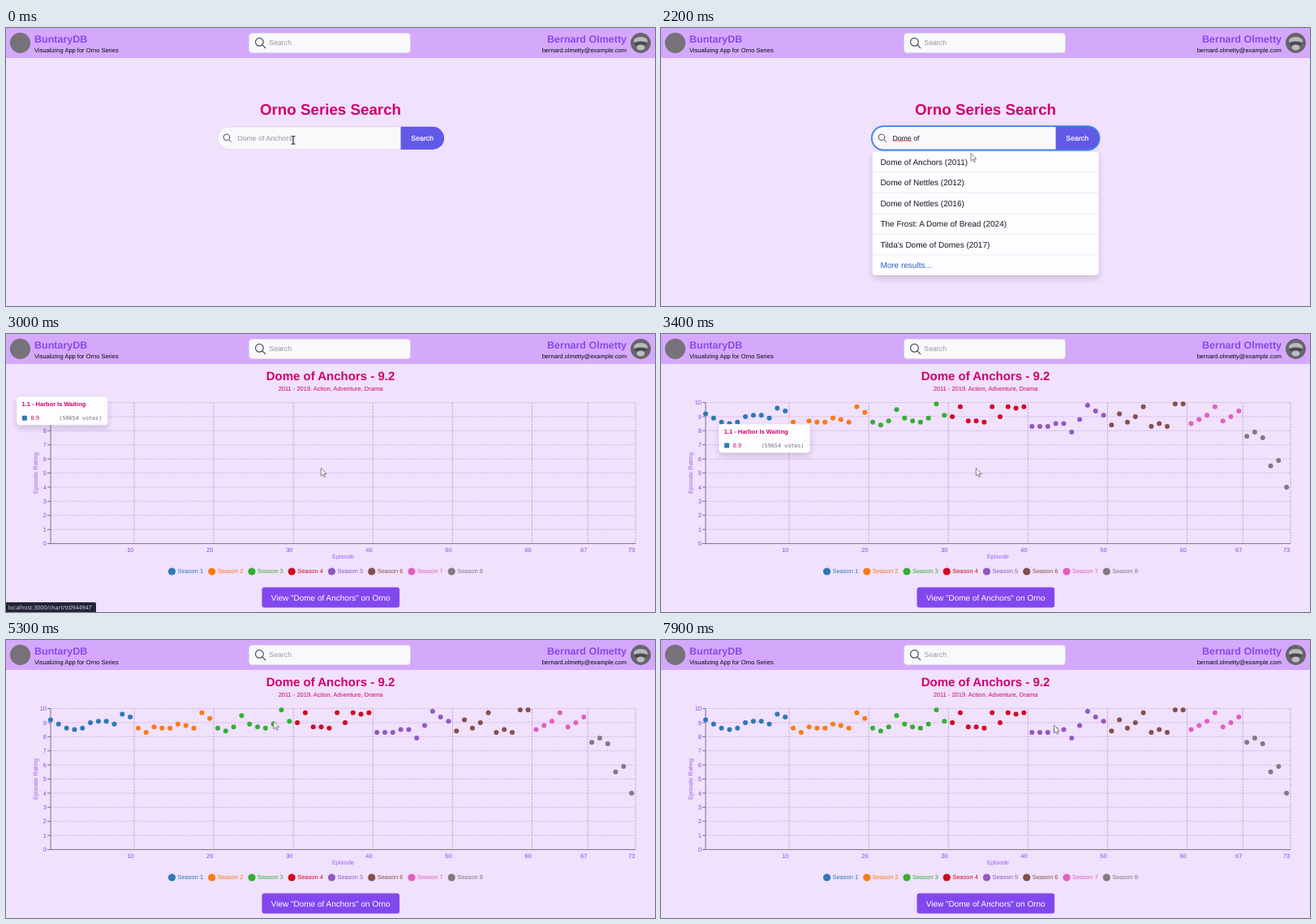
These frames come from a looping animation (800x343 px, 8000 ms). An HTML page:

```html
<!DOCTYPE html>
<html lang="en">
<head>
<meta charset="utf-8">
<title>Series search</title>
<style>
  html, body { margin: 0; width: 100%; height: 100%; overflow: hidden; background: #f0e1fc; }
  svg { display: block; width: 100%; height: 100%; }
  text {
    font-family: "Liberation Sans", Arial, sans-serif;
    white-space: pre;
    text-rendering: geometricPrecision;
  }
  .b { font-weight: 700; }
  .mono { font-family: "DejaVu Sans Mono", monospace; }
  .status { font-family: "Open Sans", sans-serif; }
</style>
</head>
<body>
<svg id="stage" viewBox="0 0 800 343">
  <defs>
    <clipPath id="round"><circle cx="782.4" cy="18.3" r="12.6"/></clipPath>
    <filter id="soft"><feGaussianBlur stdDeviation=".7"/></filter>
    <filter id="shadow" x="-20%" y="-20%" width="140%" height="150%">
      <feDropShadow dx="0" dy="4" stdDeviation="3.5" flood-color="#402060" flood-opacity=".2"/>
    </filter>
  </defs>
</svg>
<script>
const LOOP = 8000, STEP = 100;
const PINK = '#d0006f', VIOLET = '#8a48ee', INK = '#16161f', GREY = '#9395a2';
const SMALL = 7.5, INPUT = 8.75, BODY = 10, NAME = 12.5;
const SHOW = 'Dome of Anchors';
const stage = document.getElementById('stage');

function add(parent, tag, attrs = {}, content) {
  const el = document.createElementNS('http://www.w3.org/2000/svg', tag);
  for (const k in attrs) el.setAttribute(k, attrs[k]);
  if (content !== undefined) el.textContent = content;
  parent.append(el);
  return el;
}
const group = (parent, attrs) => add(parent, 'g', attrs);
const rect = (p, x, y, width, height, fill, more) =>
  add(p, 'rect', { x, y, width, height, fill, ...more });
const circle = (p, cx, cy, r, fill, more) => add(p, 'circle', { cx, cy, r, fill, ...more });
const ellipse = (p, cx, cy, rx, ry, fill) => add(p, 'ellipse', { cx, cy, rx, ry, fill });
const line = (p, x1, y1, x2, y2, stroke, more) =>
  add(p, 'line', { x1, y1, x2, y2, stroke, ...more });
const path = (p, d, more) => add(p, 'path', { d, fill: 'none', ...more });
const label = (p, x, y, size, fill, str, more) =>
  add(p, 'text', { x, y, 'font-size': size, fill, ...more }, str);
const show = (el, on) => el.setAttribute('visibility', on ? 'visible' : 'hidden');
const MID = { 'text-anchor': 'middle' }, END = { 'text-anchor': 'end' };
const BOLD = { class: 'b' };

function lens(p, x, y, r, tail, width) {
  const g = group(p, { stroke: '#4b4d5c', 'stroke-width': width, 'stroke-linecap': 'round' });
  circle(g, x, y, r, 'none');
  line(g, x + r * .72, y + r * .72, x + tail, y + tail);
}

// Soft grey shapes in the tones of a furry portrait
function portrait() {
  const g = group(group(stage, { 'clip-path': 'url(#round)' }), { filter: 'url(#soft)' });
  circle(g, 782.4, 18.3, 12.6, '#66656c');
  ellipse(g, 782.4, 16, 8.5, 5, '#b9b8bc');
  ellipse(g, 782.4, 19.3, 8, 2.8, '#4a4950');
  ellipse(g, 782.4, 24, 5, 3.4, '#bdbcc0');
}

// Header
function buildHeader() {
  rect(stage, 0, 0, 800, 37, '#d4a9fb');
  circle(stage, 17.5, 18.3, 12.6, '#77727a');
  label(stage, 35, 17.5, NAME, VIOLET, 'BuntaryDB', BOLD);
  label(stage, 35, 30, SMALL, '#0c0812', 'Visualizing App for Orno Series');
  rect(stage, 299.5, 6.3, 199, 24.4, '#f9f9fc', { rx: 4, stroke: '#d3cfe2', 'stroke-width': .7 });
  lens(stage, 312.4, 17.3, 4.9, 7.2, 1.2);
  label(stage, 324.3, 21.4, INPUT, GREY, 'Search');
  label(stage, 765, 17.5, NAME, VIOLET, 'Bernard Olmetty', { ...BOLD, ...END });
  label(stage, 765, 30, SMALL, '#0c0812', 'bernard.olmetty@example.com', END);
  portrait();
}

// Search page
const RESULTS = [
  [SHOW + ' (2011)', 'Quail Dome (2021)', "The Potter's Domino (2020)",
   'Hollow Domes (2018)', 'The Foam Dome (2022)'],
  [SHOW + ' (2011)', 'Dome of Nettles (2012)', 'Dome of Nettles (2016)',
   'The Frost: A Dome of Bread (2024)', "Tilda's Dome of Domes (2017)"],
];
const KEYS = [[500, 'D'], [600, 'Do'], [800, 'Dom'], [1200, 'Dome'],
  [1400, 'Dome '], [1500, 'Dome o'], [1600, 'Dome of']];

function buildSearch() {
  const page = group(stage);
  label(page, 400, 106.5, 18.75, PINK, 'Orno Series Search', { ...BOLD, ...MID });
  path(page, 'M487 122H275a13.9 13.9 0 0 0 0 27.8H487Z',
    { style: 'fill:#f9f9fc', stroke: '#d9d3e6', 'stroke-width': .7 });
  path(page, 'M486.6 121.8H526a14.1 14.1 0 0 1 0 28.2H486.6Z', { style: 'fill:#6159e8' });
  label(page, 513.2, 138.8, INPUT, '#fff', 'Search', { ...MID, stroke: '#fff', 'stroke-width': .2 });
  lens(page, 271.9, 134.8, 3.8, 5.7, 1);
  const ring = rect(page, 259.7, 121.1, 280.8, 29.6, 'none',
    { rx: 14.8, stroke: '#3d7fe8', 'stroke-width': 1.7 });
  const input = label(page, 285.4, 138.8, INPUT, GREY, SHOW);
  const caret = line(page, 0, 130.7, 0, 140.5, INK, { 'stroke-width': .8 });
  const wave = 'M285.5 140' + 'l1.5 -1.4l1.5 1.4'.repeat(8);
  const squiggle = path(page, wave, { stroke: '#e0303c', 'stroke-width': .8 });

  const list = group(page);
  rect(list, 260.8, 152.7, 278.6, 152.4, '#fdfcfe', { rx: 4, filter: 'url(#shadow)' });
  const hover = rect(list, 260.8, 153, 278.6, 25, '#efeef4', { rx: 3 });
  const rows = RESULTS[0].map((_, i) => {
    line(list, 261, 178.1 + i * 25.45, 539.4, 178.1 + i * 25.45, '#e5e3ec', { 'stroke-width': .7 });
    return label(list, 270.4, 168.8 + i * 25.45, BODY, INK, '');
  });
  label(list, 270.4, 296, BODY, '#2c5cc5', 'More results...');

  return t => {
    page.setAttribute('display', t < 2800 ? 'inline' : 'none');
    if (t >= 2800) return;
    const typed = KEYS.reduce((s, [at, str]) => t >= at ? str : s, '');
    input.textContent = typed || SHOW;
    input.setAttribute('fill', typed ? INK : GREY);
    const focused = t >= 300;
    show(ring, focused);
    const x = 285.8 + (typed ? input.getComputedTextLength() : 0);
    caret.setAttribute('x1', x);
    caret.setAttribute('x2', x);
    show(caret, focused && (t < 2100 || t >= 2600));
    show(squiggle, t >= 1800);
    list.setAttribute('display', t >= 1000 ? 'inline' : 'none');
    show(hover, t >= 2400);
    RESULTS[t < 1800 ? 0 : 1].forEach((str, i) => rows[i].textContent = str);
  };
}

// Chart page
const SEASONS = [
  ['#2f79b5', [9.2, 8.9, 8.6, 8.5, 8.6, 9, 9.1, 9.1, 8.9, 9.6, 9.4]],
  ['#fb7b12', [8.6, 8.3, 8.7, 8.6, 8.6, 8.9, 8.8, 8.6, 9.7, 9.3]],
  ['#32b032', [8.6, 8.4, 8.7, 9.5, 8.9, 8.7, 8.6, 8.9, 9.9, 9.1]],
  ['#d00c20', [9, 9.7, 8.7, 8.7, 8.6, 9.7, 9, 9.7, 9.6, 9.7]],
  ['#9159c0', [8.3, 8.3, 8.3, 8.5, 8.5, 7.9, 8.8, 9.8, 9.4, 9.1]],
  ['#85504a', [8.4, 9.2, 8.6, 9, 9.7, 8.3, 8.5, 8.3, 9.9, 9.9]],
  ['#e060c0', [8.5, 8.8, 9.1, 9.7, 8.7, 9, 9.4]],
  ['#7f7b80', [7.6, 7.9, 7.5, 5.5, 5.9, 4]],
];
const LEFT = 55, RIGHT = 776.2, BASE = 258.6;
const px = i => LEFT + i * 9.81;
const py = v => BASE - v * 17.41;

// CSS "ease": cubic-bezier(.25, .1, .25, 1)
function ease(x) {
  if (x <= 0) return 0;
  if (x >= 1) return 1;
  const curve = (u, a, b) => 3 * a * u * (1 - u) ** 2 + 3 * b * u * u * (1 - u) + u ** 3;
  let lo = 0, hi = 1;
  for (let i = 0; i < 24; i++) {
    const u = (lo + hi) / 2;
    if (curve(u, .25, .25) < x) lo = u; else hi = u;
  }
  return curve(lo, .1, 1);
}

function buildTooltip(page) {
  const tip = group(page);
  rect(tip, 0, 0, 112, 35, '#fdfcfe', { rx: 4, filter: 'url(#shadow)' });
  label(tip, 6.2, 11.5, SMALL, PINK, '1.1 - Harbor Is Waiting', BOLD);
  rect(tip, 6.6, 23.4, 6, 6, SEASONS[0][0], { rx: .6 });
  label(tip, 17.3, 29, SMALL, PINK, '8.9');
  label(tip, 105, 28.8, 6.78, '#6b7080', '(59654 votes)', { class: 'mono', ...END });
  return tip;
}

function buildChart() {
  const page = group(stage);
  label(page, 400, 57.2, 15, PINK, SHOW + ' - 9.2', { ...BOLD, ...MID });
  label(page, 400, 69.7, SMALL, PINK, '2011 - 2019. Action, Adventure, Drama', MID);

  const grid = group(page, { 'stroke-width': .75, 'stroke-dasharray': '2.5 1.2' });
  const axis = group(page, { 'stroke-width': .9 });
  for (let v = 0; v <= 10; v++) {
    if (v) line(grid, LEFT, py(v), RIGHT, py(v), '#c9aee0');
    line(axis, LEFT - 4, py(v), LEFT, py(v), '#70667c');
    label(page, 50, py(v) + 2.7, SMALL, VIOLET, v, END);
  }
  for (const e of [10, 20, 30, 40, 50, 60, 67, 73]) {
    line(grid, px(e + .5), py(10), px(e + .5), BASE, '#b596cc');
    label(page, px(e), 269.3, SMALL, VIOLET, e, MID);
  }
  line(axis, LEFT, py(10), LEFT, BASE, '#70667c');
  line(axis, LEFT, BASE, RIGHT, BASE, '#70667c');
  label(page, 415.5, 277.4, SMALL, '#9c62f0', 'Episode', MID);
  label(page, 0, 0, SMALL, '#9c62f0', 'Episode Rating',
    { ...MID, transform: 'translate(39.3 171.5) rotate(-90)' });

  const dots = [];
  SEASONS.forEach(([color, ratings], s) => {
    for (const v of ratings) dots.push(circle(page, px(dots.length), py(v), 3, color));
    const x = 204.5 + s * 49.25;
    circle(page, x, 293, 4.6, color);
    label(page, x + 6.9, 295.4, SMALL, color, 'Season ' + (s + 1));
  });

  rect(page, 315.5, 312.6, 169.6, 25, '#8347ee', { rx: 3 });
  label(page, 400.2, 328.6, BODY, '#fff', `View "${SHOW}" on Orno`, MID);
  const tip = buildTooltip(page);

  return t => {
    page.setAttribute('display', t >= 2800 ? 'inline' : 'none');
    const r = 3 * ease((t - 3000) / 400);
    for (const d of dots) d.setAttribute('r', r);
    const k = ease((t - 2940) / 400);
    tip.setAttribute('transform', `translate(${71.5 * k} ${69.6 + 41.6 * k})`);
    show(tip, t >= 2900 && t < 4500);
  };
}

function buildStatus() {
  const bar = group(stage);
  path(bar, 'M0 331H109q2 0 2 2V343H0Z', { style: 'fill:#232336' });
  label(bar, 2.8, 340.2, 7.05, '#dcdce4', 'localhost:3000/chart/tt0944947', { class: 'status' });
  return t => show(bar, t >= 2400 && t < 3300);
}

// Pointer: time, x, y
const TRACK = [[0, 354, 138.3], [300, 354, 138.3], [900, 363, 131.5], [1700, 363, 131.5],
  [2200, 382, 154.5], [2600, 387, 165], [3000, 388.3, 165.5], [3500, 388.3, 165.5],
  [4200, 298, 99], [6500, 364.7, 101.3], [7900, 484.6, 105.2]];

function pointerAt(t) {
  const i = TRACK.findIndex(k => k[0] > t);
  if (i < 0) return TRACK[TRACK.length - 1].slice(1);
  const [t0, x0, y0] = TRACK[i - 1], [t1, x1, y1] = TRACK[i];
  const k = (t - t0) / (t1 - t0);
  return [x0 + (x1 - x0) * k, y0 + (y1 - y0) * k];
}

function buildPointer() {
  const beam = path(stage, 'M-2.4 -5Q0 -5 0 -4Q0 -5 2.4 -5M0 -4.5V4.5M-2.4 5Q0 5 0 4Q0 5 2.4 5',
    { stroke: '#14141c', 'stroke-width': 1.1 });
  const arrow = path(stage, 'M0 0V9.6L2.2 7.5L3.8 11L5.3 10.3L3.8 7H6.8Z',
    { style: 'fill:#fff', stroke: '#5c5666', 'stroke-width': .75, 'stroke-linejoin': 'round' });
  return t => {
    const [x, y] = pointerAt(t), overInput = t < 2800 && y < 150;
    for (const el of [beam, arrow]) el.setAttribute('transform', `translate(${x} ${y})`);
    show(beam, overInput);
    show(arrow, !overInput);
  };
}

buildHeader();
const parts = [buildSearch(), buildChart(), buildStatus(), buildPointer()];
const start = performance.now();

function draw() {
  const t = (performance.now() - start) % LOOP;
  const tick = Math.floor(t / STEP) * STEP;
  for (const update of parts) update(tick);
  requestAnimationFrame(draw);
}
draw();
</script>
</body>
</html>
```
